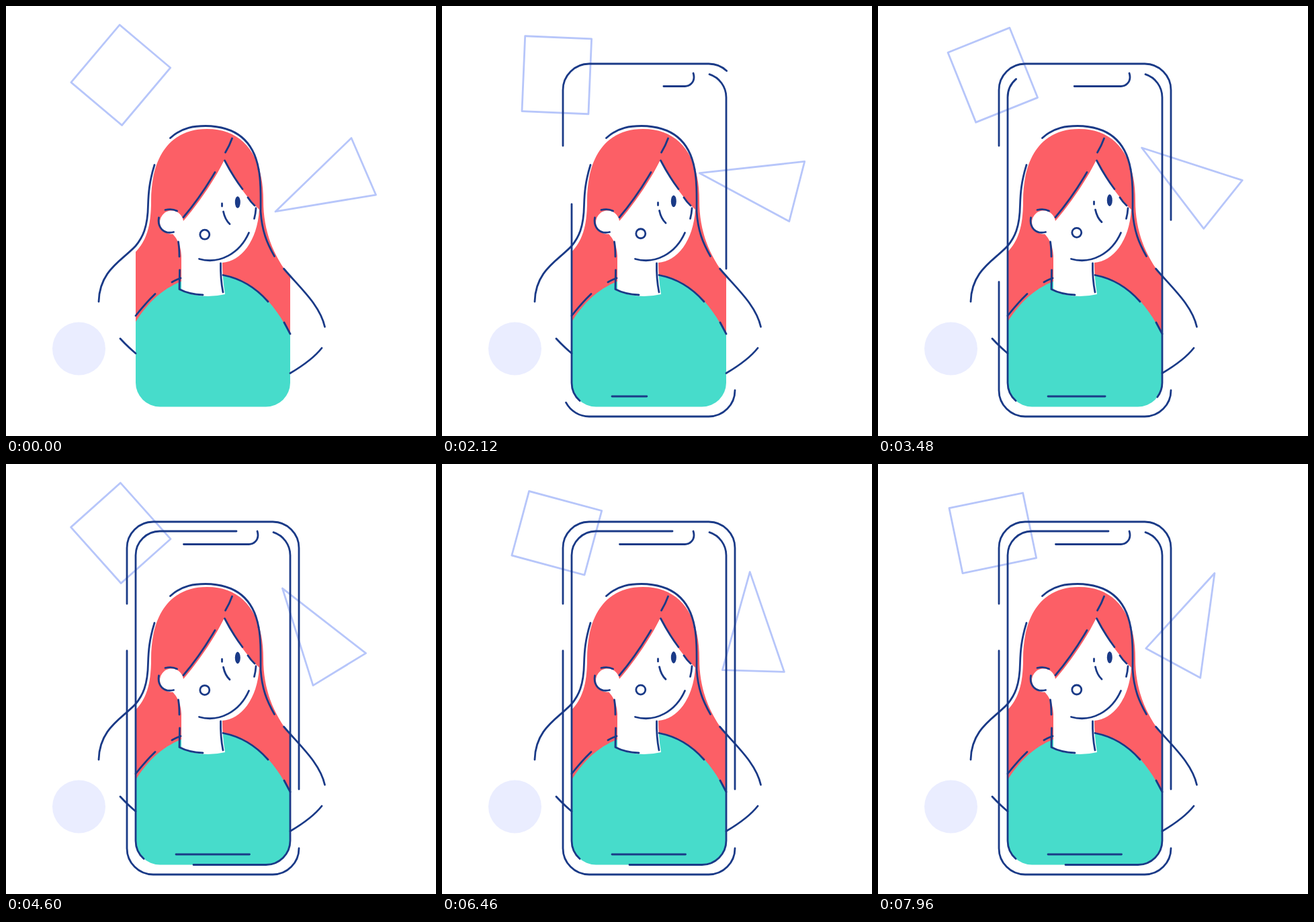
Recreate the animation shown at these times as an HTML page. Size 640x640 px, loop 8 s.

```html
<!DOCTYPE html>
<html lang="en">
<head>
<meta charset="utf-8">
<title>Portrait on a phone</title>
<style>
  html, body { margin: 0; height: 100%; overflow: hidden; background: #fff; }
  svg { display: block; width: 100vw; height: 100vh; }
  .line { fill: none; stroke: #1a3a87; stroke-width: 2.8; stroke-linecap: round; stroke-linejoin: round; }
  .pale { fill: none; stroke: #b7c6fa; stroke-width: 2.8; stroke-linejoin: round; }
</style>
</head>
<body>
<svg viewBox="0 0 640 640">
  <circle cx="108.5" cy="510" r="39.5" fill="#eaedff"/>

  <!-- hair, body, then face with ear and neck -->
  <path fill="#fc5f66" d="M193 366C208 350 216 330 216 290C216 225 244 183 299 183C355 183 383 225 383 290C383 335 398 372 423 403V492H193Z"/>
  <path fill="#47dccb" d="M193 470C214 437 245 405 305 400C360 398 400 440 423 490V560.5a36 36 0 0 1-36 36H229a36 36 0 0 1-36-36Z"/>
  <g fill="#fff">
    <path d="M325 229C310 260 284 297 264 320L248 339Q260 352 261 372V424Q292 437 326 429Q322 405 322 382C350 380 374 350 377 303C357 285 338 255 325 229Z"/>
    <circle cx="246.5" cy="322" r="17.5"/>
  </g>

  <g class="pale">
    <rect id="box" x="-49.5" y="-56" width="99" height="112"/>
    <path id="tri" d="M-74.8 54.5L38.2 -55L74.7 29.5Z"/>
  </g>

  <g class="line">
    <!-- hair -->
    <path d="M244.5 196.5C262 180 282 178.5 297 178.5C340 179 368 198 376 243"/>
    <path d="M376 243C380 262 379 285 379 306C381 335 388 352 399.5 372.5"/>
    <path d="M336.5 197Q333 207 326.5 218M325.5 230Q338 254 352 272.5M360 285Q364.500 292 370 297M372 301Q371.500 309 369.500 316.500"/>
    <path d="M311 247.500Q289 285 264 314.500"/>
    <path d="M221 236.500C213 262 212 280 211.500 296C211 330 203 345 193 357C174 378 139 393 138 440"/>
    <path d="M413.500 391C436 418 467 444 474.500 477.500"/>
    <!-- ear, jaw, neck -->
    <path d="M237 303.500Q247 301 254.500 305M227.500 315C225 330 235 340 249.500 336.500"/>
    <path d="M287.500 376.500C318 385 348 368 361.500 337.500"/>
    <path d="M256.500 351Q258 360 258 373M258.500 393L258 421.500Q272 429 293 430M319.500 383Q319 406 323 426"/>
    <!-- shoulders and arms -->
    <path d="M247 411Q253 407.500 260 405M193 461Q208 442 222 428.500M323 400.500Q362 408 390 440M414 471L423 488"/>
    <path d="M170 495Q180 506 193 517M470 509Q456 527 423 546.500"/>
  </g>

  <g id="features" class="line">
    <path d="M321.500 294V298M323.500 306Q326 318 333 324.500"/>
    <circle cx="295.800" cy="340.200" r="7"/>
    <ellipse cx="344.800" cy="292" rx="4" ry="8.800" fill="#1a3a87" stroke="none"/>
  </g>

  <g id="phone" class="line">
    <path pathLength="1" d="M180 208V125A39 39 0 0 1 219 86H397A39 39 0 0 1 436 125V484"/>
    <path pathLength="1" d="M436 572A39 39 0 0 1 397 611H219A39 39 0 0 1 180 572V278"/>
    <path pathLength="1" d="M398 101.700A36 36 0 0 1 423 136V560.500A36 36 0 0 1 387 596.500H279"/>
    <path pathLength="1" d="M205 587.500A36 36 0 0 1 193 560.500V136A36 36 0 0 1 229 100H343"/>
    <path pathLength="1" d="M374 100Q375 103 375 106A13.500 13.500 0 0 1 361.500 119.500H264.500"/>
    <path pathLength="1" d="M253 581H362.500"/>
  </g>
</svg>
<script>
  const LOOP = 8000, DRAW = 4480, SPIN = 17.82;
  const [box, tri, features, phone] =
    ["box", "tri", "features", "phone"].map(id => document.getElementById(id));

  const place = (el, x, y, angle = 0) =>
    el.setAttribute("transform", `translate(${x} ${y}) rotate(${angle})`);

  function draw(ms) {
    const s = ms / 1000;
    place(box, 170.8, 102.8, 40.2 - SPIN * s);
    place(tri, 475.8, 251.5, SPIN * s);
    place(features, 0, -4.2 * (1 - Math.exp(-0.095 * s * s)));

    const drawn = Math.min(1, ms / DRAW);
    phone.style.visibility = drawn < 0.02 ? "hidden" : "visible";
    phone.style.strokeDasharray = drawn < 1 ? `${drawn} 2` : "none";
  }

  const start = performance.now();
  function tick() {
    draw((performance.now() - start) % LOOP);
    requestAnimationFrame(tick);
  }
  tick();
</script>
</body>
</html>
```
